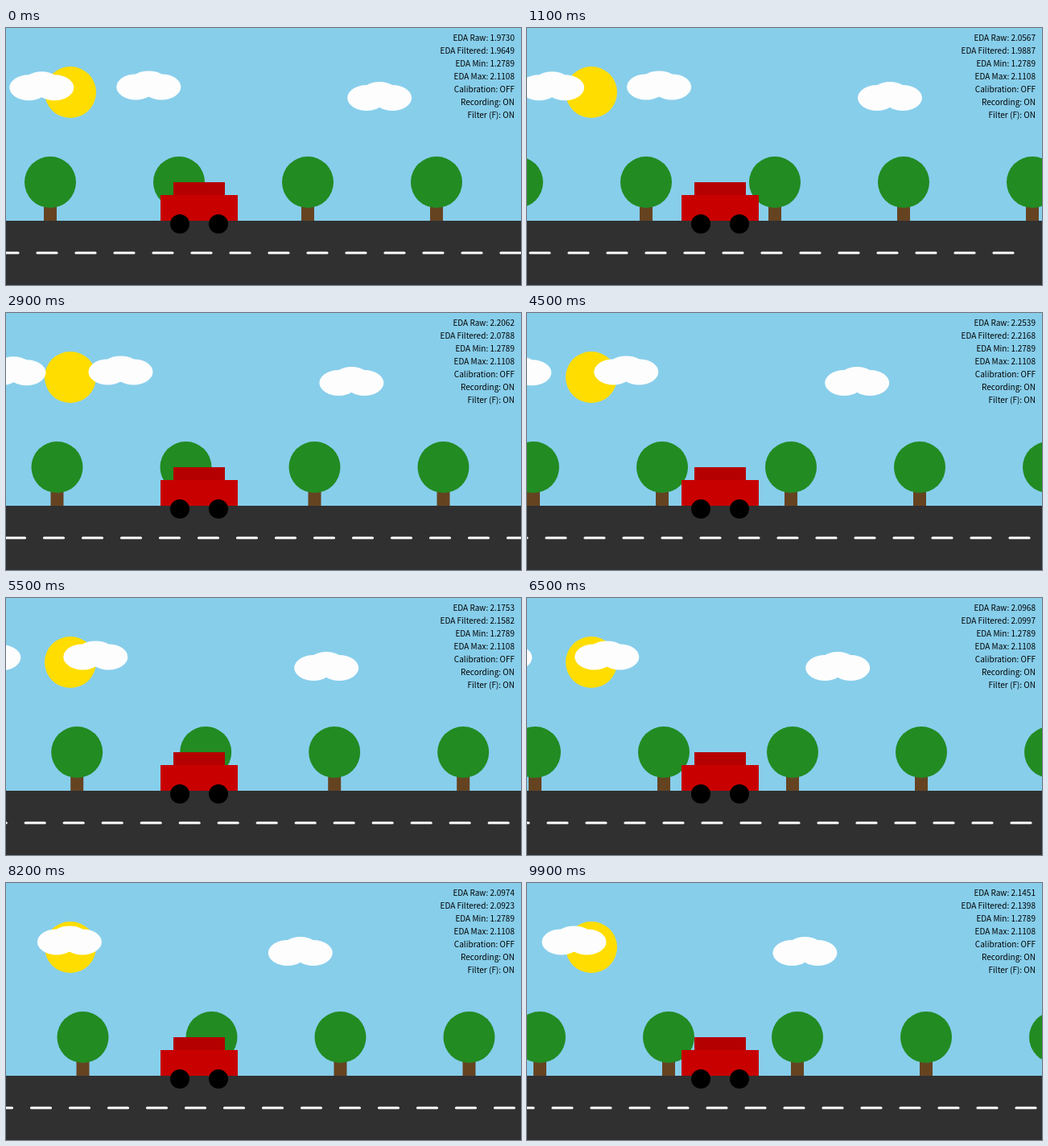
An HTML page that plays this animation: 640x320 px, repeating every 10 s.

```html
<!DOCTYPE html>
<html lang="en">
<head>
<meta charset="utf-8">
<title>EDA drive</title>
<style>
  html, body { margin: 0; width: 100%; height: 100%; overflow: hidden; background: #87ceeb; }
  svg { display: block; width: 640px; height: 320px; }
  text { font: 10.03px "Noto Sans CJK SC", "Noto Sans CJK JP", "Noto Sans CJK", sans-serif; text-anchor: end; }
</style>
</head>
<body>
<svg viewBox="0 0 640 320">
  <defs>
    <g id="cloud" fill="#fdfdfd">
      <ellipse cx="-16" rx="24" ry="16"/>
      <ellipse cy="-4" rx="24" ry="16"/>
      <ellipse cx="16" rx="24" ry="16"/>
    </g>
    <g id="tree">
      <rect x="-8" y="208" width="16" height="32" fill="#654321"/>
      <circle cy="192" r="32" fill="#228b22"/>
    </g>
  </defs>
  <rect width="640" height="320" fill="#87ceeb"/>
  <circle cx="80" cy="80" r="32" fill="#ffdd00"/>
  <g id="clouds">
    <use href="#cloud" x="44.3" y="74.2"/>
    <use href="#cloud" x="177.3" y="73.4"/>
    <use href="#cloud" x="464.2" y="87"/>
  </g>
  <rect y="240" width="640" height="80" fill="#303030"/>
  <g id="scenery">
    <path d="M0 280H1180" stroke="#fff" stroke-width="3.2" stroke-linecap="round" stroke-dasharray="24 24"/>
  </g>
  <rect x="192" y="208" width="96" height="32" fill="#c80000"/>
  <rect x="208" y="192" width="64" height="16" fill="#b40000"/>
  <circle cx="216" cy="244" r="12"/>
  <circle cx="264" cy="244" r="12"/>
  <g id="readout"></g>
</svg>
<script>
const NS = "http://www.w3.org/2000/svg";
const LOOP = 10000, STEP = 100;
const EDA_MIN = 1.2789, EDA_MAX = 2.1108;
const TOP_SPEED = 240, START = 345, WRAP = 640, CLOUD_SPEED = 12;

// seconds, raw EDA, filtered EDA, distance driven
const keys = [
  [0, 1.9730, 1.9649, 0],
  [1.1, 2.0567, 1.9887, 227],
  [2.9, 2.2062, 2.0788, 631.5],
  [4.5, 2.2539, 2.2168, 1007],
  [6.5, 2.0968, 2.0997, 1485],
  [8.2, 2.0974, 2.0923, 1879.5],
  [9.9, 2.1451, 2.1398, 2279]
];

const byId = id => document.getElementById(id);
const clouds = byId("clouds"), scenery = byId("scenery"), readout = byId("readout");

function add(parent, name, attrs) {
  const el = parent.appendChild(document.createElementNS(NS, name));
  for (const k in attrs) el.setAttribute(k, attrs[k]);
  return el;
}

for (let i = 0; i < 8; i++) add(scenery, "use", { href: "#tree", x: 80 + i * 160 });

const lines = [
  "EDA Raw: ", "EDA Filtered: ",
  "EDA Min: " + EDA_MIN, "EDA Max: " + EDA_MAX,
  "Calibration: OFF", "Recording: ON", "Filter (F): ON"
].map((label, i) => {
  const el = add(readout, "text", { x: 632, y: 16 + i * 16 });
  el.textContent = label;
  return el;
});

const mix = (a, b, u) => a + (b - a) * u;
const speedAt = eda => TOP_SPEED * Math.min(1, (eda - EDA_MIN) / (EDA_MAX - EDA_MIN));

// cubic Hermite between two distances with known speeds
function travel(a, b, u) {
  const span = b[0] - a[0], v = 1 - u;
  return a[3] * v * v * (1 + 2 * u) + b[3] * u * u * (3 - 2 * u)
    + span * u * v * (v * speedAt(a[2]) - u * speedAt(b[2]));
}

function draw(ms) {
  const t = Math.floor(ms % LOOP / STEP) * STEP / 1000;
  let i = 0;
  while (i < keys.length - 2 && t >= keys[i + 1][0]) i++;
  const a = keys[i], b = keys[i + 1], u = (t - a[0]) / (b[0] - a[0]);
  const offset = (START + travel(a, b, u)) % WRAP;

  scenery.setAttribute("transform", `translate(${-offset} 0)`);
  clouds.setAttribute("transform", `translate(${-CLOUD_SPEED * t} 0)`);
  lines[0].textContent = "EDA Raw: " + mix(a[1], b[1], u).toFixed(4);
  lines[1].textContent = "EDA Filtered: " + mix(a[2], b[2], u).toFixed(4);
}

const began = performance.now();
function tick() {
  draw(performance.now() - began);
  requestAnimationFrame(tick);
}
tick();
</script>
</body>
</html>
```
